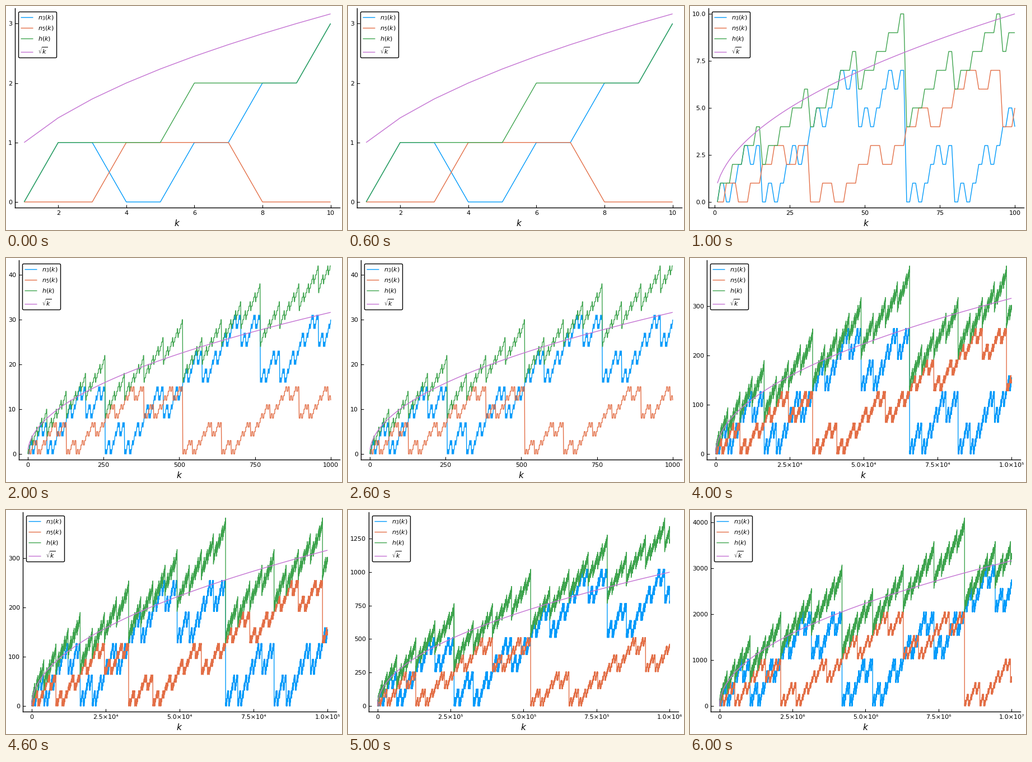
A matplotlib script for the animation above (7 s loop, 600x400 px).

```python
import numpy as np
import matplotlib.pyplot as plt
from matplotlib.animation import FuncAnimation

W, H, DPI = 600, 400, 100
TOP, BOTTOM = 4, 360
COLORS = ["#009afa", "#e36f47", "#3ea44e", "#c371d2"]
LABELS = ["$n_3(k)$", "$n_5(k)$", "$h(k)$", r"$\sqrt{k}$"]

# For each power of ten: left edge, right edge, y tick step, last y tick
SCENES = [
    (16, 596, 1, 3),
    (33, 596, 2.5, 10),
    (23, 596, 10, 40),
    (30, 596, 20, 120),
    (30, 590, 100, 300),
    (37, 590, 250, 1250),
    (37, 590, 1000, 4000),
]

plt.rcParams["font.family"] = "DejaVu Sans"
plt.rcParams["mathtext.fontset"] = "dejavusans"
fig = plt.figure(figsize=(W / DPI, H / DPI), dpi=DPI, facecolor="white")
ax = fig.add_axes([0, 0, 1, 1])


def every_other_bit(k, start):
    """Pack the bits start, start + 2, start + 4, ... of k together."""
    return sum(((k >> (start + 2 * i)) & 1) << i for i in range(12))


def sample(n):
    """Both ends of each power-of-two block, where the extremes lie."""
    block = 2 ** max(0, int(np.log2(n / 4240)))
    first = np.arange(0, n + 1, block)
    return np.unique(np.clip(np.concatenate([first, first + block - 1]), 1, n))


def x_label(v):
    if v < 20000:
        return f"{v:.0f}"
    mantissa, power = f"{v:.1e}".split("e+")
    return f"{mantissa}×10" + "⁰¹²³⁴⁵⁶⁷⁸⁹"[int(power)]


def padded(low, high):
    pad = 0.03 * (high - low)
    return low - pad, high + pad


def draw(i):
    n = 10 ** (i + 1)
    left, right, step, last = SCENES[i]
    k = sample(n)
    n3, n5 = every_other_bit(k, 1), every_other_bit(k, 2)
    curves = [n3, n5, n3 + n5, np.sqrt(k)]

    ax.clear()
    ax.set_position([left / W, 1 - BOTTOM / H, (right - left) / W, (BOTTOM - TOP) / H])
    for y, color, label in zip(curves, COLORS, LABELS):
        ax.plot(k, y, color=color, lw=1, label=label, solid_capstyle="butt")

    ax.set_xlim(padded(1, n))
    ax.set_ylim(padded(0, max(y.max() for y in curves)))
    xs = np.arange(2, 11, 2) if i == 0 else np.linspace(0, n, 5)
    ys = np.arange(0, last + step / 2, step)
    ax.set_xticks(xs, [x_label(v) for v in xs])
    ax.set_yticks(ys, [f"{v:.1f}" if step == 2.5 else f"{v:.0f}" for v in ys])
    ax.tick_params(direction="in", labelsize=8)
    ax.set_xlabel("$k$", fontsize=11)
    ax.spines[["top", "right"]].set_visible(False)
    ax.spines[["left", "bottom"]].set_linewidth(1)

    legend = ax.legend(loc="upper left", fontsize=8, framealpha=1,
                       facecolor="white", edgecolor="black")
    legend.get_frame().set_linewidth(1)
    return []


anim = FuncAnimation(fig, draw, frames=len(SCENES), interval=1000,
                     init_func=lambda: draw(0), repeat=True, repeat_delay=0)
plt.show()
```
